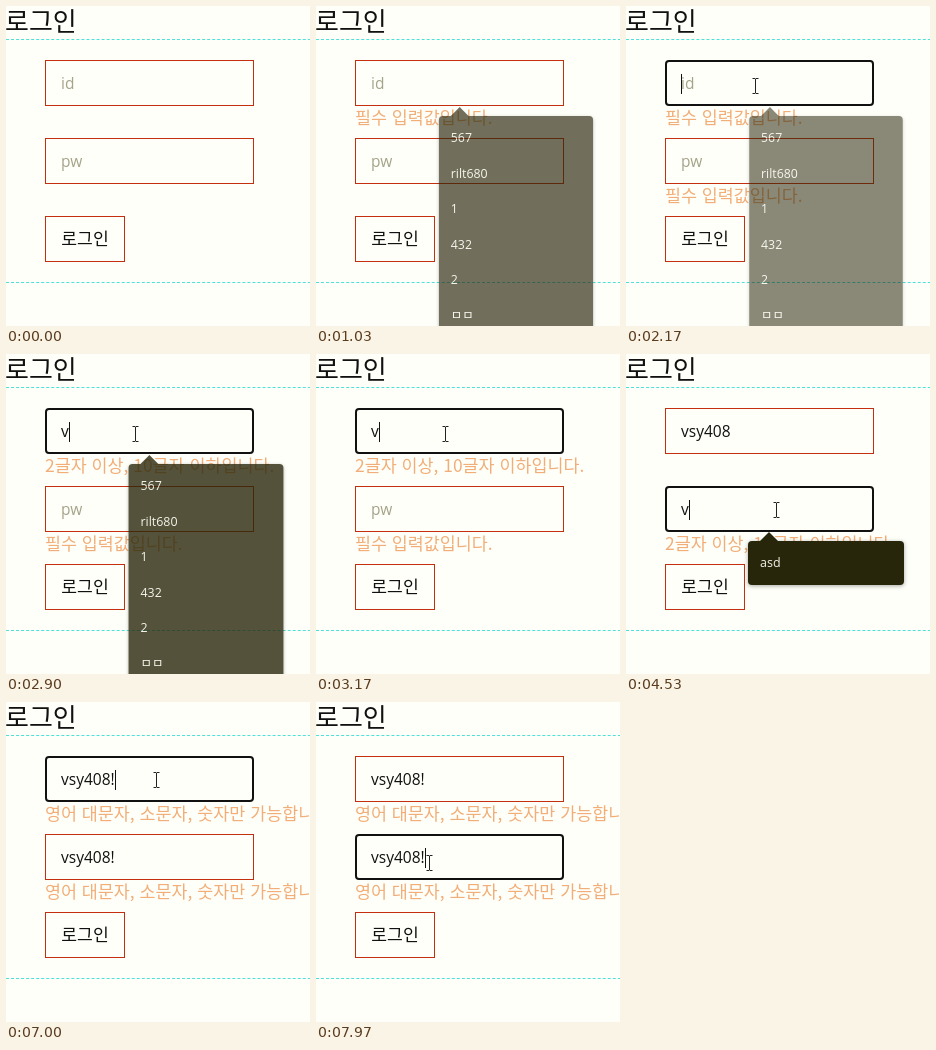
Recreate the animation shown at these times as an HTML page. Size 304 by 320 pixels, loop 8 s.

```html
<!DOCTYPE html>
<html lang="ko">
<head>
<meta charset="utf-8">
<title>로그인</title>
<style>
  html, body { margin: 0; width: 100%; height: 100%; overflow: hidden; background: #fffffa; }
  #stage {
    position: relative; width: 304px; height: 320px; overflow: hidden; color: #111;
    font: 15.5px "Open Sans", "Noto Sans CJK KR", "Noto Sans CJK", sans-serif;
  }
  #stage > * { position: absolute; box-sizing: border-box; white-space: pre; }
  .ko { font-family: "Noto Sans CJK KR", "Noto Sans CJK", "Noto Sans", sans-serif; }
  h1 { left: -1px; top: -1px; margin: 0; font-size: 26px; font-weight: 400; line-height: 29px; }
  .rule { left: 0; width: 340px; height: 0; border-top: 1px dashed #4fe0dc; }
  .box { left: 39px; height: 46px; border: 1px solid #c4300f; line-height: 44px; }
  .field { width: 209px; padding-left: 15px; }
  .focus { border: 2px solid #111; border-radius: 4px; padding-left: 14px; line-height: 42px; }
  .hint { color: #a5a48a; }
  .caret { display: inline-block; width: 1px; height: 20px; margin-right: -1px; background: #111; vertical-align: -5px; }
  .error { left: 39px; font-size: 17.4px; line-height: 24px; color: #f2ae78; }
  #login { top: 210px; width: 80px; font-size: 17.2px; line-height: 42px; text-align: center; }
  .menu {
    left: 122px; width: 156px; padding: 4px 0 4px 12px; border-radius: 4px;
    background: #28260a; color: #f2f2e8; font-size: 12.5px; line-height: 35.6px;
    box-shadow: 0 1px 4px rgba(0, 0, 0, .35);
  }
  .menu::before {
    content: ""; position: absolute; left: 12px; top: -9px;
    border: 9px solid transparent; border-top: 0; border-bottom-color: #28260a;
  }
  #mouse { left: 0; top: 0; width: 24px; height: 24px; overflow: visible; }
</style>
</head>
<body>
<div id="stage">
  <h1 class="ko">로그인</h1>
  <div class="rule" style="top:33px"></div>
  <div class="rule" style="top:276px"></div>
  <div class="box ko" id="login">로그인</div>
  <svg id="mouse">
    <path id="beam" d="M-3-7.5h2.5L0-7 .5-7.5H3M0-7V7M-3 7.5h2.5L0 7 .5 7.5H3" fill="none" stroke="#222"/>
    <path id="arrow" d="M0 0v16l4-3.5 2.5 6 2.5-1-2.5-5.8H12z" fill="#fff" stroke="#111"/>
  </svg>
</div>
<script>
const LOOP = 8000, BLINK = 530, FADE = 150;
const REQUIRED = '필수 입력값입니다.';
const LENGTH = '2글자 이상, 10글자 이하입니다.';
const CHARS = '영어 대문자, 소문자, 숫자만 가능합니다.';
const WORD = 'vsy408!';

// Times in ms: focus and menu are [start, end]; keys add one letter each.
const fields = [
  {
    top: 54, hint: 'id', items: ['567', 'rilt680', '1', '432', '2', 'ㅁㅁ', 'asd'],
    focus: [[420, 930], [2050, 4040], [6480, 7790]],
    menu: [[420, 980], [2090, 2870]],
    keys: [2800, 3300, 3370, 3450, 3550, 3650, 6900],
    errors: [[930, REQUIRED], [2800, LENGTH], [3300, ''], [6900, CHARS]]
  },
  {
    top: 132, hint: 'pw', items: ['asd'],
    focus: [[1390, 1800], [4040, 6480], [7790, LOOP]],
    menu: [[1420, 1800], [4070, 4560]],
    keys: [4530, 5000, 5040, 5080, 5130, 5170, 6070],
    errors: [[1800, REQUIRED], [4530, LENGTH], [5000, ''], [6070, CHARS]]
  }
];

// Pointer stops: time, x, y
const path = [
  [30, 316, 130], [380, 180, 78], [460, 180, 78], [700, 316, 90],
  [1120, 316, 150], [1350, 200, 155], [1430, 200, 155], [1680, 316, 160],
  [1820, 316, 130], [2030, 129, 80], [3400, 129, 80], [3700, 138, 80],
  [3870, 138, 80], [4030, 150, 156], [6200, 150, 156], [6450, 150, 78],
  [7200, 150, 78], [7600, 140, 98], [7670, 140, 98], [7790, 113, 160.5]
];

const stage = document.getElementById('stage');
const mouse = document.getElementById('mouse');
const beam = document.getElementById('beam');
const arrow = document.getElementById('arrow');

function add(parent, tag, cls, text = '') {
  const el = document.createElement(tag);
  el.className = cls;
  el.textContent = text;
  parent.insertBefore(el, parent === stage ? mouse : null);
  return el;
}

for (const f of fields) {
  f.box = add(stage, 'div', 'box field');
  f.box.style.top = f.top + 'px';
  f.text = add(f.box, 'span', '');
  f.caret = add(f.box, 'span', 'caret');
  f.ghost = add(f.box, 'span', 'hint', f.hint);
  f.error = add(stage, 'div', 'error ko');
  f.error.style.top = f.top + 45 + 'px';
}
for (const f of fields) {
  f.list = add(stage, 'div', 'menu');
  f.list.style.top = f.top + (f.hint === 'id' ? 56 : 55) + 'px';
  for (const item of f.items) add(f.list, 'div', '', item);
}

const clamp = v => Math.max(0, Math.min(1, v));

function drawField(f, t) {
  const focus = f.focus.find(([a, b]) => t >= a && t < b);
  const typed = f.keys.filter(k => k <= t);
  const text = WORD.slice(0, typed.length);
  const since = focus ? t - Math.max(focus[0], ...typed) : 0;
  const error = f.errors.filter(e => e[0] <= t).pop();
  const shown = Math.max(...f.menu.map(([a, b]) =>
    Math.min(clamp((t - a) / FADE), clamp(1 - (t - b) / FADE))));

  f.box.classList.toggle('focus', !!focus);
  f.text.textContent = text;
  f.ghost.style.display = text ? 'none' : '';
  f.caret.style.visibility = focus && Math.floor(since / BLINK) % 2 === 0 ? 'visible' : 'hidden';
  f.error.textContent = error ? error[1] : '';
  f.list.style.opacity = shown;
  f.list.style.transform = `scaleX(${0.965 + 0.035 * shown})`;
}

function drawMouse(t) {
  const i = path.findIndex(p => p[0] > t);
  const a = path[i < 0 ? path.length - 1 : Math.max(0, i - 1)];
  const b = i < 0 ? a : path[i];
  const u = clamp((t - a[0]) / (b[0] - a[0] || 1));
  const k = u * u * (3 - 2 * u);
  const x = a[1] + (b[1] - a[1]) * k, y = a[2] + (b[2] - a[2]) * k;
  const over = x > 39 && x < 248 && fields.some(f => y > f.top && y < f.top + 46);
  mouse.style.transform = `translate(${Math.round(x) + .5}px, ${Math.round(y)}px)`;
  beam.style.display = over ? '' : 'none';
  arrow.style.display = over ? 'none' : '';
}

const start = performance.now();
function frame() {
  const t = (performance.now() - start) % LOOP;
  for (const f of fields) drawField(f, t);
  drawMouse(t);
  requestAnimationFrame(frame);
}
frame();
</script>
</body>
</html>
```
